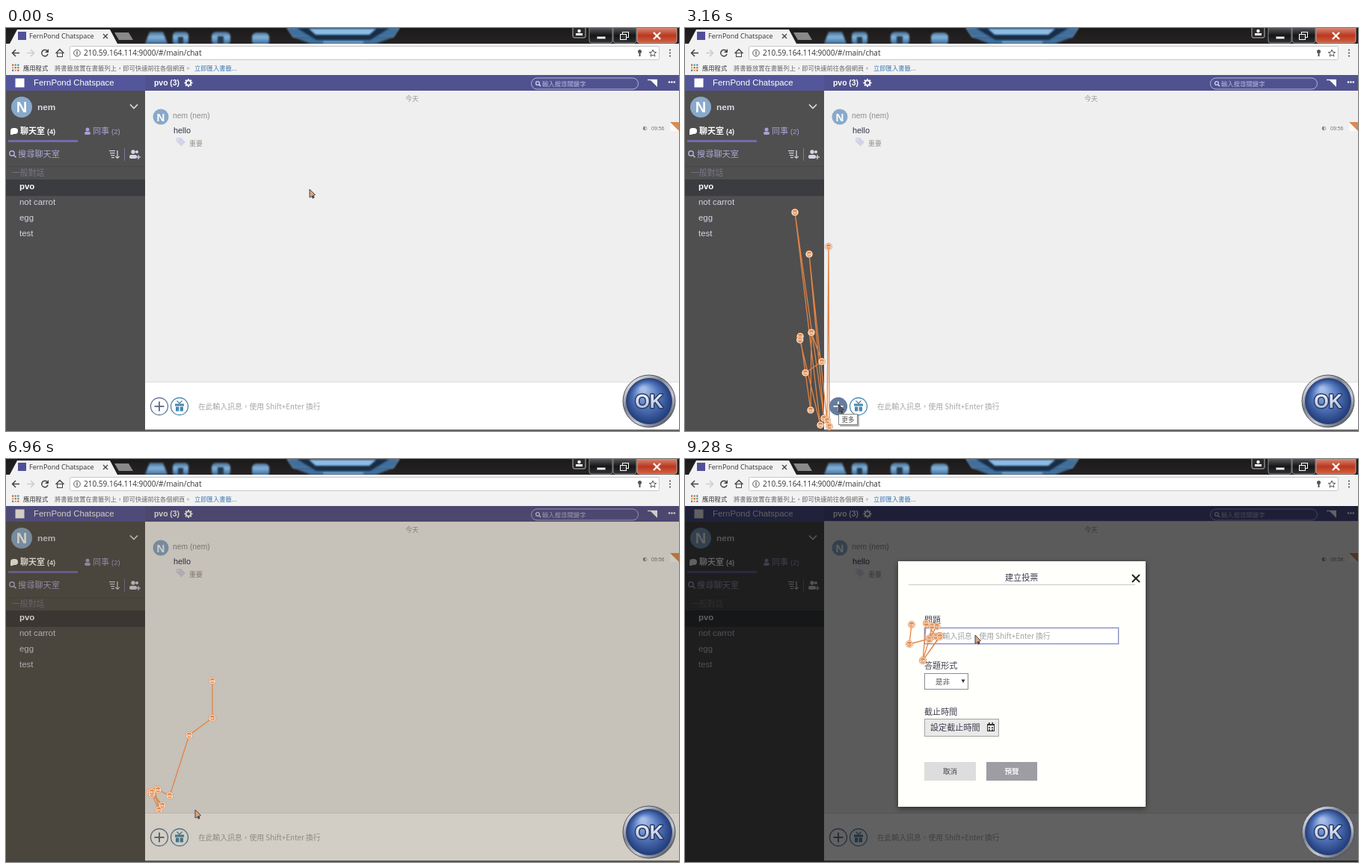
An HTML page with a canvas that plays this animation: 900 by 540 pixels, repeating every 9.32 s.

```html
<!DOCTYPE html>
<html lang="zh-Hant">
<head>
<meta charset="utf-8">
<title>Chat poll demo</title>
<style>
html, body { margin: 0; width: 100%; height: 100%; overflow: hidden; background: #4f4f4f; }
canvas { display: block; width: 900px; height: 540px; }
</style>
</head>
<body>
<canvas id="stage" width="900" height="540"></canvas>
<script>
const LOOP = 9320, TICK = 40, TRAIL = 438, TAU = Math.PI * 2;
const ctx = document.getElementById('stage').getContext('2d');
const UI = '"Liberation Sans", Arial, "Noto Sans CJK TC", "Noto Sans CJK JP", sans-serif';
const CJK = '"Noto Sans CJK TC", "Noto Sans CJK JP", sans-serif';
const CHROME = '"Open Sans", "Noto Sans", "Noto Sans CJK TC", sans-serif';
const HINT = '在此輸入訊息，使用 Shift+Enter 換行';

const clamp = v => Math.max(0, Math.min(1, v));
const lerp = (a, b, p) => a + (b - a) * p;
const ease = p => p * p * (3 - 2 * p);

function paint(fill, stroke, width = 1) {
  if (fill) { ctx.fillStyle = fill; ctx.fill(); }
  if (stroke) { ctx.strokeStyle = stroke; ctx.lineWidth = width; ctx.stroke(); }
}
function rect(x, y, w, h, fill, stroke) {
  if (fill) { ctx.fillStyle = fill; ctx.fillRect(x, y, w, h); }
  if (stroke) {
    ctx.strokeStyle = stroke;
    ctx.lineWidth = 1;
    ctx.strokeRect(x + .5, y + .5, w - 1, h - 1);
  }
}
function round(x, y, w, h, r, fill, stroke, width) {
  ctx.beginPath();
  ctx.roundRect(x, y, w, h, r);
  paint(fill, stroke, width);
}
function disc(x, y, r, fill, stroke, width) {
  ctx.beginPath();
  ctx.arc(x, y, r, 0, TAU);
  paint(fill, stroke, width);
}
function path(points, closed, fill, stroke, width) {
  ctx.beginPath();
  points.forEach(([x, y]) => ctx.lineTo(x, y));
  if (closed) ctx.closePath();
  paint(fill, stroke, width);
}
function seg(x, y, dx, dy, color, width = 1.3) {
  path([[x, y], [x + dx, y + dy]], false, null, color, width);
}
function triangle(x, y, dx, dy, fill) {
  path([[x, y], [x + dx, y], [x, y + dy]], true, fill);
}
// Symmetric trapezoid around a centre line
function trap(cx, y, top, bottom, h, fill, stroke, width) {
  path([[cx - top, y], [cx + top, y], [cx + bottom, y + h], [cx - bottom, y + h]], true, fill, stroke, width);
}
function chevron(x, y, r, turn, color, width = 1.5) {
  ctx.save();
  ctx.translate(x, y);
  ctx.rotate(turn * Math.PI / 2);
  path([[-r, -r], [0, 0], [r, -r]], false, null, color, width);
  ctx.restore();
}
function cross(x, y, r, color, width) {
  seg(x - r, y - r, 2 * r, 2 * r, color, width);
  seg(x - r, y + r, 2 * r, -2 * r, color, width);
}
function plus(x, y, r, color, width) {
  seg(x - r, y, 2 * r, 0, color, width);
  seg(x, y - r, 0, 2 * r, color, width);
}
function lens(x, y, r, color) {
  disc(x, y, r, null, color, 1.4);
  seg(x + r * .7, y + r * .7, r, r, color, 1.6);
}
function text(str, x, y, size, color, font = UI, weight = 400, align = 'left') {
  ctx.font = `${weight} ${size}px ${font}`;
  ctx.fillStyle = color;
  ctx.textAlign = align;
  ctx.fillText(str, x, y);
}
function fade(alpha, draw) {
  if (alpha <= 0) return;
  ctx.save();
  ctx.globalAlpha = alpha;
  draw();
  ctx.restore();
}
function gradient(g, ...colors) {
  colors.forEach((c, i) => g.addColorStop(i / (colors.length - 1), c));
  return g;
}
const vertical = (y0, y1, ...colors) => gradient(ctx.createLinearGradient(0, y0, 0, y1), ...colors);
function avatar(y, x, r, size) {
  disc(x, y, r, '#88a9cb');
  text('N', x, y + size * .37, size, '#fff', UI, 700, 'center');
}

function titleBar() {
  rect(0, 0, 900, 22, vertical(0, 22, '#1b1a1b', '#262324'));
  ctx.save();
  ctx.beginPath();
  ctx.rect(0, 0, 900, 21);
  ctx.clip();
  ctx.filter = 'blur(1.2px)';
  const glow = vertical(3, 21, '#2c5277', '#86b4da', '#3f6f9c');
  trap(201, 5, 9, 15, 16, glow);
  round(223, 5, 21, 18, 5, glow);
  round(275, 5, 25, 18, 6, glow);
  round(329, 6, 23, 18, 6, glow);
  rect(230, 12, 7, 9, '#26384b');
  rect(283, 11, 8, 10, '#26384b');
  trap(451, 0, 75, 67, 12, '#3f6f9c', '#8fb5d6');
  trap(451, 12, 67, 44, 9, '#3f6f9c');
  trap(451, 0, 62, 36, 16, '#182d46');
  trap(450, 1, 45, 36, 8, '#8bbce5');
  seg(424, 19, 54, 0, '#a4cbed');
  ctx.restore();

  trap(77, 2, 62, 72, 19, '#f2f2f2');
  rect(16, 5, 11, 11, '#514f99');
  text('FernPond Chatspace', 31, 14, 9, '#333', CHROME);
  cross(133, 11, 3, '#444', 1.3);
  path([[145, 6], [164, 6], [170, 16], [151, 16]], true, '#898989');

  round(758, -3, 17, 16, 2, '#292929', '#bbb');
  disc(766.5, 4, 2.2, '#fff');
  rect(762, 7, 9, 3, '#fff');
  const glass = vertical(0, 20, '#55565a', '#151517', '#303136');
  for (const x of [780, 812]) round(x, -4, 31, 24, 3, glass, '#8c8c8c');
  round(844, -4, 53, 24, 3, vertical(0, 20, '#d78672', '#b93922', '#d4603d'), '#c3a39b');
  rect(790, 11, 12, 4, '#fff', '#777');
  rect(824, 5, 9, 8, null, '#fff');
  rect(821, 8, 9, 8, '#333', '#fff');
  cross(870.5, 10.5, 4.5, '#fff', 2.4);
}

function browserBars() {
  rect(0, 21, 900, 43, '#f2f2f2');
  seg(9, 33.5, 9, 0, '#444', 1.5);
  chevron(8.5, 33.5, 4.5, 1, '#444');
  seg(28, 33.5, 9, 0, '#ccc', 1.5);
  chevron(37.5, 33.5, 4.5, 3, '#ccc');
  ctx.beginPath();
  ctx.arc(52, 33.5, 4.2, .3, 5.4);
  paint(null, '#444', 1.5);
  triangle(57, 33, -5, -5, '#444');
  chevron(72, 28.5, 5.5, 2, '#444');
  rect(68, 33, 8, 6, null, '#444');

  round(85.5, 24.5, 788, 18, 2, '#fff', '#c8c8c8');
  disc(95, 33.5, 4.3, null, '#555');
  seg(95, 31, 0, 5, '#555', 1.2);
  text('210.59.164.114:9000/#/main/chat', 104, 37, 10, '#333', CHROME);
  disc(847.5, 31.5, 2.5, '#555');
  rect(846.5, 33, 2, 5, '#555');
  const star = Array.from({ length: 10 }, (_, i) => {
    const a = i * TAU / 10 - TAU / 4, r = i % 2 ? 2.2 : 5;
    return [865 + r * Math.cos(a), 34 + r * Math.sin(a)];
  });
  path(star, true, null, '#555');
  for (let i = 0; i < 3; i++) disc(888, 29.5 + i * 4, 1.1, '#555');

  const dots = ['#d8553f', '#4b9b58', '#4a7cc8', '#dba43b'];
  for (let i = 0; i < 9; i++) rect(8 + i % 3 * 3.6, 48.5 + (i / 3 | 0) * 3.6, 2.2, 2.2, dots[i % 4]);
  text('應用程式', 23, 56.5, 8.3, '#333', CJK);
  text('將書籤放置在書籤列上，即可快速前往各個網頁。', 65, 56.5, 8.3, '#666', CJK);
  text('立即匯入書籤...', 252, 56.5, 8.3, '#3c78b4', CJK);
}

function sidebar() {
  const lilac = '#a6a2d3', pale = '#d5d5e5';
  rect(0, 63, 186, 477, '#4f4f4f');
  rect(0, 63, 186, 21, '#54569b');
  rect(12.5, 67.5, 12, 12, '#fff');
  text('FernPond Chatspace', 37, 77, 11.4, '#fff');

  avatar(106, 21, 14, 20);
  text('nem', 42, 110, 11.8, '#d9d9e6', UI, 700);
  chevron(171, 107.5, 5, 0, '#ddd', 1.7);

  round(6, 134, 10, 8, 4, '#fff');
  triangle(6, 143, 4, -5, '#fff');
  text('聊天室', 19, 142, 11, '#fff', CJK, 700);
  text('(4)', 55, 142, 9, '#fff', UI, 700);
  disc(109, 136, 2.5, lilac);
  round(105, 139, 8, 4, 2, lilac);
  text('同事', 116, 142, 11, lilac, CJK);
  text('(2)', 141, 142, 9.5, lilac);
  rect(3, 150, 93, 3, '#706cad');

  lens(8, 168, 3.2, '#b5b3d9');
  text('搜尋聊天室', 16, 173, 11.2, '#aaa8d5', CJK);
  for (let i = 0; i < 4; i++) rect(138 + i, 164 + i * 3, 8 - i * 1.4, 1.2, pale);
  seg(149, 164, 0, 10, pale);
  chevron(149, 174.5, 2.7, 0, pale, 1.2);
  rect(158, 161, 1, 17, '#7a78a8');
  disc(170, 166, 2.7, pale);
  disc(175, 166, 2, pale);
  round(165, 170, 10, 5, 2, pale);
  plus(177, 173, 3, pale);
  rect(0, 185, 186, 1, '#474747');
  text('一般對話', 8, 198, 10.8, '#77778a', CJK);
  rect(0, 203, 186, 22, '#3b3c40');
  text('pvo', 18, 216, 11.4, '#fff', UI, 700);
  ['not carrot', 'egg', 'test'].forEach((s, i) => text(s, 18, 237 + i * 21, 11.4, '#d6d5e9'));
}

function header() {
  rect(186, 63, 714, 21, '#505290');
  text('pvo (3)', 198, 77, 10.4, '#fff', UI, 700);
  for (let i = 0; i < 8; i++) {
    const c = Math.cos(i * TAU / 8), s = Math.sin(i * TAU / 8);
    seg(244 + c * 3.5, 73.5 + s * 3.5, c * 2, s * 2, '#fff', 2);
  }
  disc(244, 73.5, 3.2, null, '#fff', 1.7);
  round(702.5, 67, 143, 15, 7.5, null, '#b6b6da');
  lens(711, 74, 2.4, '#c9c9e6');
  text('輸入搜尋關鍵字', 717, 77.5, 8.4, '#b8b8dc', CJK);
  seg(858, 69.5, 13, 0, '#fff');
  triangle(871, 70, -9, 9, '#fff');
  for (let i = 0; i < 3; i++) disc(887 + i * 3.4, 72.5, 1.3, '#fff');
}

function chat(hover) {
  header();
  rect(186, 84, 714, 390, '#efefef');
  text('今天', 543, 97.5, 8.8, '#999', CJK, 400, 'center');
  avatar(119, 207, 10.5, 15);
  text('nem (nem)', 223, 121, 10.3, '#8c8c8c');
  text('hello', 224, 141, 10.9, '#33334c');
  path([[228, 147], [234, 147], [240, 153], [234.5, 158.5], [228, 152]], true, '#d2d3ea');
  disc(230.5, 149.5, 1, '#efefef');
  text('重要', 245, 157.5, 9, '#94948a', CJK);
  disc(854.5, 134.5, 2.4, '#eee', '#888', .7);
  ctx.beginPath();
  ctx.arc(854.5, 134.5, 2.4, TAU / 4, TAU * .75);
  paint('#777');
  text('09:56', 863, 136.5, 7, '#777');
  triangle(900, 126, -12, 12, '#d98b55');
  rect(888, 126, 12, 12, '#d98b55');
  triangle(888, 138, 12, -12, '#fafafa');

  rect(186, 474, 714, 64, '#fff');
  rect(186, 474, 714, 1, '#dedede');
  rect(186, 538, 714, 2, '#666');
  disc(205, 507, 11.5, hover ? '#667e9e' : '#fff', '#637797', 1.3);
  plus(205, 507, 6.5, hover ? '#fff' : '#56698a', 1.8);
  const blue = '#4b89ad';
  disc(232, 507, 11.5, '#fff', blue, 1.3);
  rect(226, 503.5, 12, 3, blue);
  for (const x of [227, 232.7]) rect(x, 507.5, 4.3, 6, blue);
  chevron(232, 503, 3.5, 0, blue, 1.3);
  text(HINT, 257, 510.5, 9.8, '#a6a6a6', CJK);
}

function tooltip() {
  rect(207, 519, 26, 15, 'rgba(0,0,0,.3)');
  rect(205, 517, 26, 15, '#fff', '#858585');
  text('更多', 218, 528, 8.6, '#555', CJK, 400, 'center');
}

function okBall() {
  const rim = gradient(ctx.createLinearGradient(835, 470, 885, 530), '#f0f0f2', '#7d828e', '#c7cad2', '#4c515e');
  disc(860, 500, 35, rim, '#4c5260');
  const ball = gradient(ctx.createRadialGradient(852, 484, 3, 860, 500, 31), '#a5bde8', '#5276bc', '#203a78');
  disc(860, 500, 30.5, ball, '#31446f');
  ctx.lineJoin = 'round';
  ctx.font = `700 25px ${UI}`;
  ctx.textAlign = 'center';
  ctx.strokeStyle = '#283c6b';
  ctx.lineWidth = 3;
  ctx.strokeText('OK', 860, 508.5);
  text('OK', 860, 508.5, 25, vertical(490, 509, '#f3f5fa', '#b4bfd8'), UI, 700, 'center');
  ctx.lineJoin = 'miter';
}

function dialog(caret) {
  const ink = '#3e3e50';
  const label = (str, y, x = 320) => text(str, x, y, 11.1, ink, CJK);
  ctx.save();
  ctx.shadowColor = 'rgba(0,0,0,.55)';
  ctx.shadowBlur = 7;
  ctx.shadowOffsetY = 2;
  rect(285, 137, 331, 329, '#fffffb');
  ctx.restore();
  label('建立投票', 163, 428);
  rect(299, 168, 303, 1, '#c9c9c9');
  cross(603, 160, 5, '#222', 1.9);

  label('問題', 220);
  rect(319, 225, 262, 24, '#d9dcf2');
  rect(320, 226, 260, 22, '#fff', '#8389bb');
  text(HINT, 325, 240.5, 9.8, '#a0a0a0', CJK);
  if (caret) rect(323, 231, 1, 12, '#333');

  label('答題形式', 281);
  rect(320, 287, 59, 22, '#fff', '#8c8c94');
  text('是非', 335, 301.5, 9.6, '#555', CJK);
  trap(372, 295.5, 2.5, 0, 4.5, '#333');

  label('截止時間', 342.5);
  rect(320, 348, 100, 24, '#e9e9e9', '#a4a4a4');
  label('設定截止時間', 364, 328);
  rect(404, 355, 10, 10, null, '#333');
  rect(404, 355, 10, 2, '#333');
  for (const x of [406, 410.5]) rect(x, 353, 1.5, 3, '#333');
  for (let i = 0; i < 4; i++) rect(406 + i % 2 * 4, 359 + (i >> 1) * 3, 2, 2, '#555');

  rect(320, 406, 69, 25, '#dddddd');
  text('取消', 354.5, 421.5, 9.6, '#444', CJK, 400, 'center');
  rect(403, 406, 68, 25, '#9d9da3');
  text('預覽', 437, 421.5, 9.6, '#f4f4f4', CJK, 700, 'center');
}

// Pointer moves: start, duration, target
const MOVES = [[400, 700, 205, 504], [5600, 900, 253, 470], [6960, 390, 375, 336], [8300, 700, 388, 236]];
function pointerAt(t) {
  let x = 406, y = 216;
  for (const [start, span, tx, ty] of MOVES) {
    const p = ease(clamp((t - start) / span));
    x = lerp(x, tx, p);
    y = lerp(y, ty, p);
  }
  return [x, y];
}
function pointer(x, y, dark) {
  ctx.save();
  ctx.translate(x, y);
  seg(3, 7, 2.4, 5, '#4a4458', 3);
  path([[0, 0], [0, 11], [7.5, 7.5]], true, dark ? '#515868' : '#dda37c', '#4a4458');
  ctx.restore();
}

// Viewing runs: end time, then stops as x, y, fixation count, spread
const RUNS = [
  [1720, [167, 508, 5, 9], [168, 466, 5, 8], [151, 405], [168, 439], [169, 457]],
  [3160, [161, 462], [183, 447], [169, 408], [168, 512], [156, 417, 2, 4], [181, 532],
    [147, 247], [186, 523], [166, 303], [190, 526], [192, 293], [193, 534]],
  [4600, [172, 453], [177, 476, 7, 7], [178, 511], [198, 485], [180, 472], [203, 500]],
  [6960, [201, 458, 7, 9], [219, 451], [245, 370], [276, 347], [276, 297]],
  [7400, [353, 322, 4, 6], [314, 242, 7, 7]],
  [9280, [303, 222], [300, 248], [341, 237], [318, 270], [331, 230, 6, 9], [318, 270], [341, 238]]
];
function buildGaze() {
  let seed = 7;
  const jitter = r => ((seed = seed * 16807 % 2147483647) / 2147483647 * 2 - 1) * r;
  const out = [];
  let from = { t: 400, x: 375, y: 195 };
  for (const [end, ...stops] of RUNS) {
    const start = end - 430, [x0, y0] = stops[0];
    for (let t = from.t + TICK; t <= start; t += TICK) {
      const p = ease(Math.floor((t - from.t) / (start - from.t) * 5) / 5);
      out.push({ t, x: lerp(from.x, x0, p) + jitter(12), y: lerp(from.y, y0, p) + jitter(20) });
    }
    const run = stops.flatMap(([x, y, n = 1, spread = 0]) =>
      Array.from({ length: n }, () => ({ x: x + jitter(spread), y: y + jitter(spread * 1.7) })));
    run.forEach((p, k) => out.push({ ...p, t: start + 430 * (k + 1) / run.length }));
    from = out[out.length - 1];
  }
  return out.map((p, i) => ({ ...p, id: 100 + i }));
}
const GAZE = buildGaze();

function gazeTrail(t) {
  const seen = GAZE.filter(p => p.t <= t && p.t > t - TRAIL);
  path(seen.map(p => [p.x, p.y]), false, null, '#e28445', 1.3);
  for (const p of seen) {
    disc(p.x, p.y, 4.9, '#d98a50');
    disc(p.x, p.y, 4, '#e08748', '#f7ece2');
    text(p.id, p.x, p.y + 1.5, 4, '#fff', UI, 700, 'center');
  }
}

function draw(t) {
  const [x, y] = pointerAt(t);
  const hover = Math.hypot(x - 205, y - 507) < 11.5;
  titleBar();
  browserBars();
  sidebar();
  chat(hover);
  fade(Math.min(clamp((t - 1640) / 160), clamp((4280 - t) / 160)), tooltip);

  const dim = clamp((t - 6905) / 150), warm = 1 - dim;
  if (dim) {
    rect(0, 63, 900, 477, `rgba(${90 * warm},${62 * warm},0,${.62 * dim})`);
    rect(186, 83, 714, 1, '#4a4c88');
  }
  fade(clamp((t - 7080) / 200), () => dialog(t < 8000));
  okBall();
  pointer(x, y, hover);
  gazeTrail(t);
}

function frame() {
  draw(Math.floor(performance.now() % LOOP / TICK + .01) * TICK);
  requestAnimationFrame(frame);
}
frame();
</script>
</body>
</html>
```
